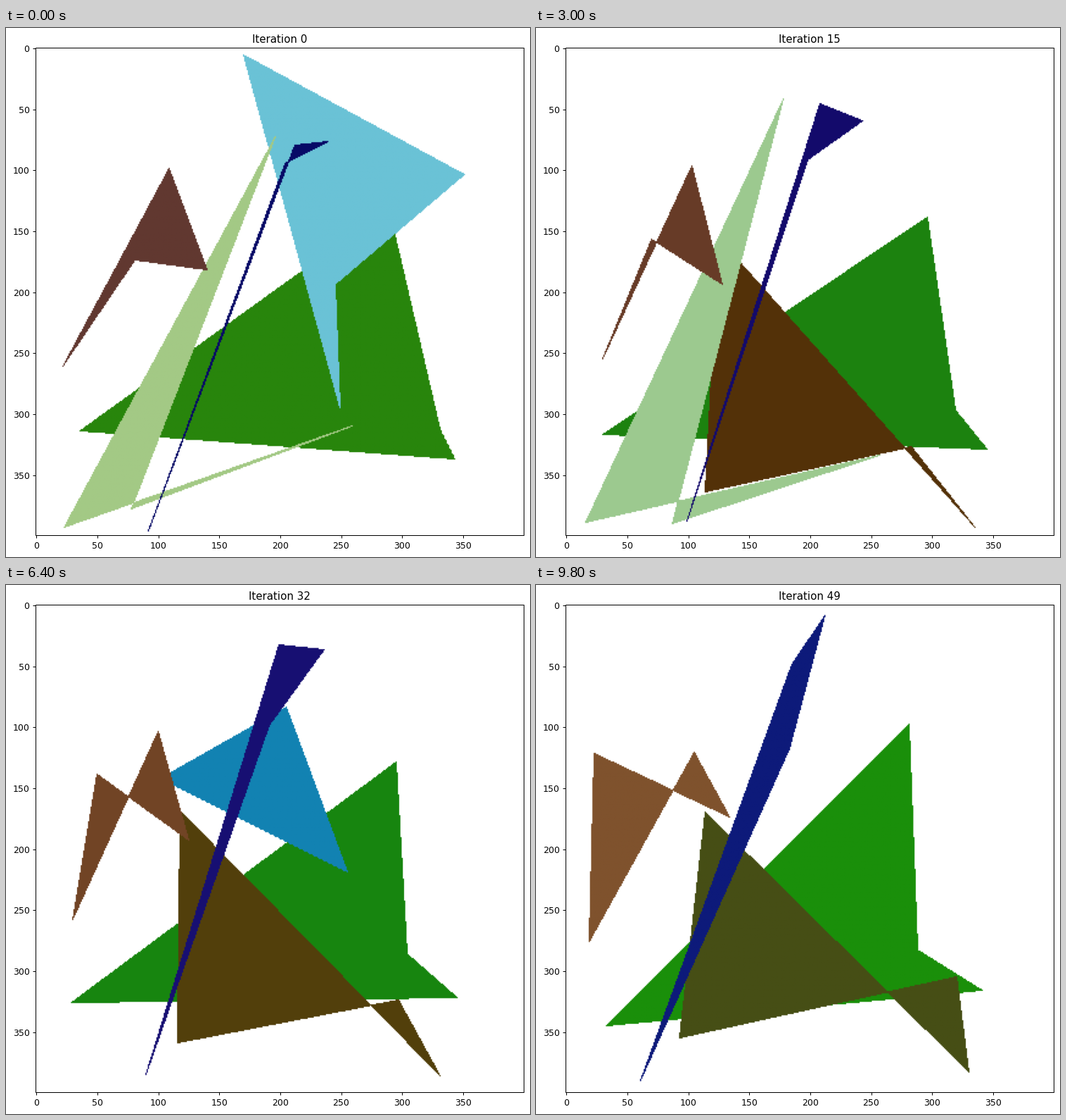
Recreate the animation shown at these times as a matplotlib script. Size 745 by 752 pixels, loop 10000 ms.

```python
import numpy as np
import matplotlib.pyplot as plt
from matplotlib.animation import FuncAnimation
from matplotlib.colors import to_rgb

W, H, DPI = 745, 752, 90
LEFT, TOP, SIDE = 42.3, 28.0, 693.4   # plot area on the stage, in pixels
N = 400                               # canvas resolution
FRAMES, INTERVAL = 50, 200


class Quad:
    """Four-cornered shape that drifts evenly through a few poses."""

    def __init__(self, first, last, *poses):
        self.first, self.last = first, last
        self.times = np.linspace(first, last, len(poses))
        self.poses = np.array([[*to_rgb(c), *xy] for c, *xy in poses])

    def visible(self, i):
        return self.first <= i <= self.last

    def at(self, i):
        """Colour, and corners as whole canvas cells."""
        v = np.array([np.interp(i, self.times, p) for p in self.poses.T])
        cells = (v[3:].reshape(4, 2) - (LEFT, TOP)) * N / SIDE
        return v[:3], np.floor(cells).astype(int)


# Back to front; each pose is a colour and corners as stage x, y pairs
green = Quad(0, 49,
             ("#28850c", 106, 574, 544, 257, 617, 572, 637, 613),
             ("#168112", 89, 580, 565, 277, 583, 526, 643, 591),
             ("#1a8f0a", 101, 627, 530, 199, 542, 519, 635, 576))
sky = Quad(0, 3, ("#6ac2d6", 338, 40, 651, 210, 468, 365, 474, 540))
umber = Quad(4, 49,
             ("#522908", 268, 279, 632, 721, 524, 593, 225, 664),
             ("#563b09", 250, 322, 617, 699, 545, 600, 257, 654),
             ("#464e15", 241, 324, 615, 693, 598, 558, 204, 645))
lime = Quad(0, 23,
            ("#a3c985", 383, 156, 83, 710, 493, 567, 179, 684),
            ("#9fc88f", 367, 101, 67, 703, 493, 600, 187, 705),
            ("#96cd92", 318, 101, 77, 703, 478, 625, 208, 703))
azure = Quad(24, 35, ("#1282b2", 398, 174, 486, 408, 226, 278, 178, 299))
brown = Quad(0, 49,
             ("#613830", 232, 200, 81, 482, 184, 331, 285, 344),
             ("#6c3e22", 214, 196, 103, 463, 151, 282, 253, 378),
             ("#7f522d", 225, 239, 76, 508, 83, 241, 275, 330))
navy = Quad(0, 49,
            ("#070a66", 203, 716, 410, 167, 457, 163, 396, 194),
            ("#1c0b6f", 222, 692, 400, 73, 470, 115, 380, 185),
            ("#0d1a7a", 149, 705, 363, 114, 410, 45, 361, 234))
LAYERS = [green, sky, umber, lime, azure, brown, navy]

gy, gx = np.mgrid[:N, :N]


def fill_mask(corners):
    """Even-odd fill of a polygon, its outline included."""
    inside = np.zeros((N, N), bool)
    outline = np.zeros((N, N), bool)
    for a, b in zip(corners, np.roll(corners, -1, axis=0)):
        (x0, y0), (x1, y1) = a, b
        if y0 != y1:
            spans = (gy >= y0) != (gy >= y1)
            inside ^= spans & (gx < x0 + (gy - y0) * (x1 - x0) / (y1 - y0))
        steps = np.abs(b - a).max() + 1
        line = np.rint(np.linspace(a, b, steps)).astype(int)
        x, y = line[((line >= 0) & (line < N)).all(axis=1)].T
        outline[y, x] = True
    return inside | outline


def paint(i):
    canvas = np.ones((N, N, 3))
    for quad in LAYERS:
        if quad.visible(i):
            colour, corners = quad.at(i)
            canvas[fill_mask(corners)] = colour
    return canvas


plt.rcParams["font.family"] = "DejaVu Sans"
fig = plt.figure(figsize=((W + 1e-6) / DPI, (H + 1e-6) / DPI), dpi=DPI,
                 facecolor="white")
ax = fig.add_axes([LEFT / W, 1 - (TOP + SIDE) / H, SIDE / W, SIDE / H])
picture = ax.imshow(paint(0), aspect="auto")
title = ax.set_title("Iteration 0", fontsize=12)


def update(i):
    picture.set_data(paint(i))
    title.set_text(f"Iteration {i}")
    return picture, title


anim = FuncAnimation(fig, update, frames=FRAMES, interval=INTERVAL,
                     repeat=True, repeat_delay=0, blit=False)
plt.show()
```
